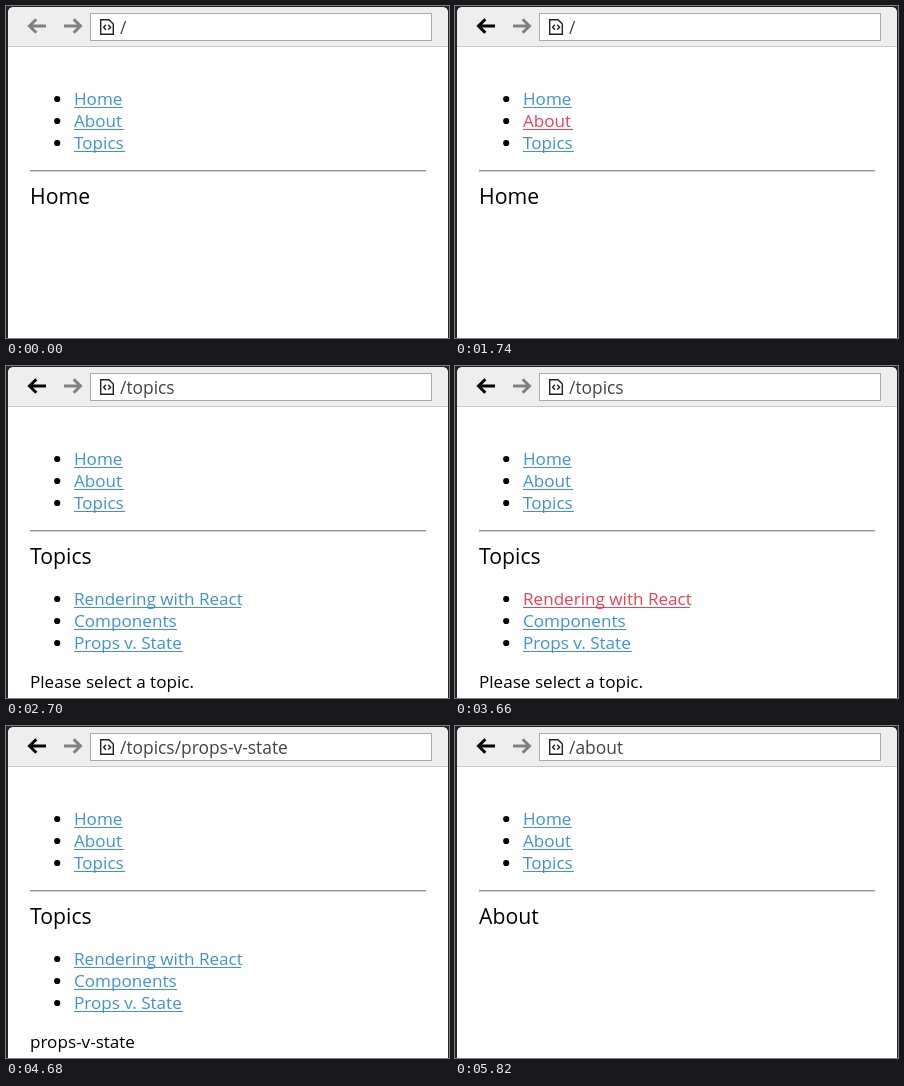
Recreate the animation shown at these times as an HTML page. Size 443 px wide and 332 px high, loop 7800 ms.

```html
<!DOCTYPE html>
<html lang="en">
<head>
<meta charset="utf-8">
<title>Router demo</title>
<style>
  html, body { margin: 0; width: 100%; height: 100%; overflow: hidden; background: #222; }
  svg { display: block; width: 100vw; height: 100vh; }
  text { font-family: "Open Sans", "Noto Sans", sans-serif; font-size: 17.1px; white-space: pre; }
  .heading { font-size: 21.2px; }
  .url { font-size: 17.4px; fill: #444; }
  .link { fill: #3d95c4; }
  .link.active { fill: #ee4050; }
  .arrow { fill: none; stroke: #808080; stroke-width: 3; }
  .arrow.on { stroke: #000; }
  .icon { fill: none; stroke: #222; stroke-width: 1.4; }
</style>
</head>
<body>
<svg viewBox="0 0 443 332">
  <path fill="#fff" d="M2 332V7q0-6 6-6H436q6 0 6 6V332z"/>
  <path fill="#eee" d="M2 40V7q0-6 6-6H436q6 0 6 6V40z"/>
  <rect x="2" y="40" width="440" height="1" fill="#c8c8c8"/>
  <path id="back" class="arrow" d="M40 20H24M30.3 13.2L23.5 20L30.3 26.8"/>
  <path class="arrow" d="M58 20H74M67.7 13.2L74.5 20L67.7 26.8"/>
  <rect x="84.5" y="7.5" width="341" height="27" fill="#fff" stroke="#aaa"/>
  <path class="icon" d="M94.7 13.7H103L107.3 18V28.3H94.7z"/>
  <path class="icon" d="M100 18.8L97.6 21.3L100 23.8M102.2 18.8L104.6 21.3L102.2 23.8"/>
  <text id="url" class="url" x="114" y="28"></text>
  <g id="menu"></g>
  <rect x="24" y="164" width="396" height="1" fill="#969696"/>
  <rect x="24" y="165" width="396" height="1" fill="#cfcfcf"/>
  <text id="heading" class="heading" x="24" y="198"></text>
  <g id="submenu"></g>
  <text id="body" x="24" y="322"></text>
</svg>
<script>
  const LOOP = 7800;
  const byId = id => document.getElementById(id);
  const [back, url, heading, submenu, body] =
    ["back", "url", "heading", "submenu", "body"].map(byId);
  const links = {};

  function add(parent, tag, attrs, text = "") {
    const el = document.createElementNS("http://www.w3.org/2000/svg", tag);
    for (const key in attrs) el.setAttribute(key, attrs[key]);
    el.textContent = text;
    return parent.appendChild(el);
  }

  function addLink(parent, label, baseline, width) {
    add(parent, "circle", { cx: 51.2, cy: baseline - 6, r: 3.1 });
    const link = links[label] = add(parent, "g", { class: "link" });
    add(link, "text", { x: 68, y: baseline }, label);
    add(link, "rect", { x: 68, y: baseline + 2, width, height: 1 });
  }

  addLink(byId("menu"), "Home", 99, 49);
  addLink(byId("menu"), "About", 121, 50);
  addLink(byId("menu"), "Topics", 143, 51);
  addLink(submenu, "Rendering with React", 239, 167);
  addLink(submenu, "Components", 261, 103);
  addLink(submenu, "Props v. State", 283, 109);

  // Each visit: link pressed, time of press, time of release, path, title, body.
  const visits = [
    ["", 0, 0, "/", "Home", ""],
    ["Home", 1260, 1320, "/", "Home", ""],
    ["About", 1740, 1920, "/about", "About", ""],
    ["Topics", 2520, 2700, "/topics", "Topics", "Please select a topic."],
    ["Rendering with React", 3660, 3720, "/topics/rendering", "Topics", "rendering"],
    ["Components", 4140, 4200, "/topics/components", "Topics", "components"],
    ["Props v. State", 4620, 4680, "/topics/props-v-state", "Topics", "props-v-state"],
    ["About", 5700, 5820, "/about", "About", ""]
  ];

  function setText(el, text) {
    if (el.textContent !== text) el.textContent = text;
  }

  function render(time) {
    const [, , , path, title, message] = visits.filter(v => v[2] <= time).pop();
    const pressed = visits.find(v => v[1] <= time && time < v[2]);
    setText(url, path);
    setText(heading, title);
    setText(body, message);
    submenu.style.display = title === "Topics" ? "" : "none";
    back.classList.toggle("on", time >= visits[1][2]);
    for (const label in links)
      links[label].classList.toggle("active", !!pressed && pressed[0] === label);
  }

  const start = performance.now();
  function tick() {
    render((performance.now() - start) % LOOP);
    requestAnimationFrame(tick);
  }
  tick();
</script>
</body>
</html>
```
